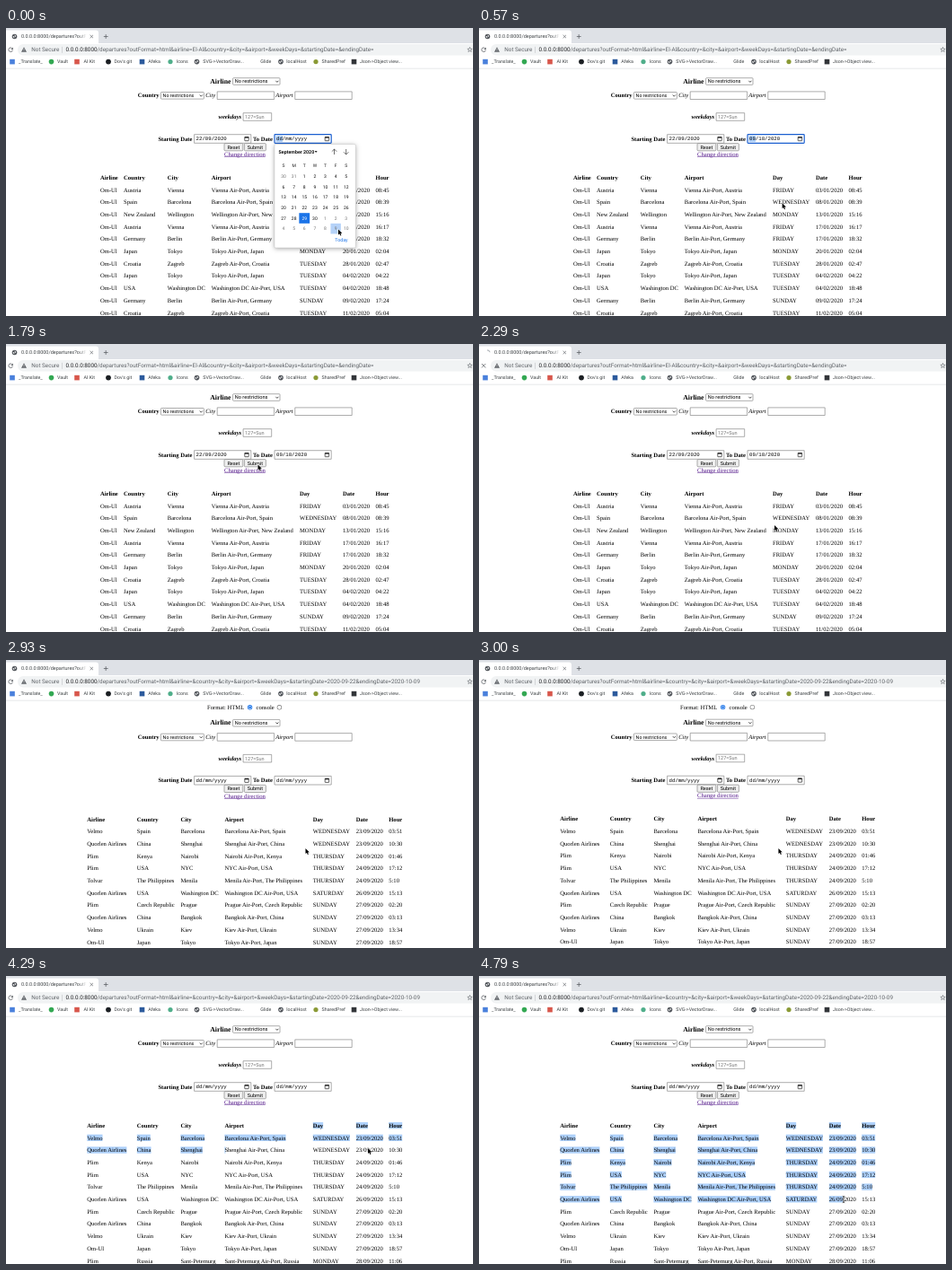
Recreate the animation shown at these times as an HTML page with a canvas. Size 520x321 px, loop 5 s.

```html
<!DOCTYPE html>
<html lang="en">
<head>
<meta charset="utf-8">
<title>Departures</title>
<style>
html, body { margin: 0; width: 100%; height: 100%; overflow: hidden; background: #fff; }
canvas { display: block; width: 520px; height: 321px; }
</style>
</head>
<body>
<canvas id="stage"></canvas>
<script>
const W = 520, H = 321, LOOP = 5000, TICK = 500 / 7;
const canvas = document.getElementById('stage');
const dpr = window.devicePixelRatio || 1;
canvas.width = W * dpr;
canvas.height = H * dpr;
const c = canvas.getContext('2d');
c.scale(dpr, dpr);
c.textRendering = 'geometricPrecision';

const SERIF = '"Liberation Serif", "Times New Roman", serif';
const SANS = 'Roboto, Arial, sans-serif';
const MONO = '"Liberation Mono", "Courier New", monospace';
const BODY = 6.6, ROW = 13.7, TOP = 166.6, SCROLL = 10.7;
const PAGE_TOP = 45.5;

const HEAD = ['Airline', 'Country', 'City', 'Airport', 'Day', 'Date', 'Hour'];

// airline, country, city, day, date, hour
function parse(list) {
  return [HEAD, ...list.trim().split('\n').map(line => {
    const [air, land, city, day, date, hour] = line.trim().split('|');
    return [air, land, city, `${city} Air-Port, ${land}`, day, date + '/2020', hour];
  })];
}

const before = {
  cols: [105, 131, 179.8, 228.8, 327, 375, 411.5],
  rows: parse(`
    Om-Ul|Austria|Vienna|FRIDAY|03/01|08:45
    Om-Ul|Spain|Barcelona|WEDNESDAY|08/01|08:39
    Om-Ul|New Zealand|Wellington|MONDAY|13/01|15:16
    Om-Ul|Austria|Vienna|FRIDAY|17/01|16:17
    Om-Ul|Germany|Berlin|FRIDAY|17/01|18:32
    Om-Ul|Japan|Tokyo|MONDAY|20/01|02:04
    Om-Ul|Croatia|Zagreb|TUESDAY|28/01|02:47
    Om-Ul|Japan|Tokyo|TUESDAY|04/02|04:22
    Om-Ul|USA|Washington DC|TUESDAY|04/02|18:48
    Om-Ul|Germany|Berlin|SUNDAY|09/02|17:24
    Om-Ul|Croatia|Zagreb|TUESDAY|11/02|05:04`)
};
const after = {
  cols: [90.3, 145.8, 194.4, 243.4, 341.8, 389.8, 426.2],
  rows: parse(`
    Velmo|Spain|Barcelona|WEDNESDAY|23/09|03:51
    Quorlen Airlines|China|Shenghai|WEDNESDAY|23/09|10:30
    Plim|Kenya|Nairobi|THURSDAY|24/09|01:46
    Plim|USA|NYC|THURSDAY|24/09|17:12
    Tolvar|The Philippines|Menila|THURSDAY|24/09|5:10
    Quorlen Airlines|USA|Washington DC|SATURDAY|26/09|15:13
    Plim|Czech Republic|Prague|SUNDAY|27/09|02:20
    Quorlen Airlines|China|Bangkok|SUNDAY|27/09|03:13
    Velmo|Ukrain|Kiev|SUNDAY|27/09|13:34
    Om-Ul|Japan|Tokyo|SUNDAY|27/09|18:57
    Plim|Russia|Sant-Petemurg|MONDAY|28/09|11:06`)
};

const HOST = '0.0.0.0:8000';
const QUERY = '/departures?outFormat=html&airline=';
const REST = '&country=&city=&airport=&weekDays=&startingDate=';

// Timeline
const CLOSE = [140, 290], BLUR = 1780, LOAD = 1850, SWAP = 2430, LOADED = 2500;
const scrollKeys = [[2980, 0], [3220, SCROLL]];
const selectKeys = [[4080, 4], [4286, 17], [4571, 38], [4786, 47.55]];
const pathX = [[360, 370], [929, 266.5], [1286, 263], [1500, 280], [2071, 281],
  [2286, 329], [2500, 333.5], [2929, 333.5], [3429, 332.5], [4000, 397], [4286, 403], [4571, 405], [4786, 406]];
const pathY = [[360, 224.5], [929, 131], [1286, 132.8], [1500, 134], [2071, 135],
  [2286, 202], [2500, 210], [2929, 210], [3429, 209], [4000, 180.5], [4286, 192], [4571, 237], [4786, 249]];

const ease = p => p * p * (3 - 2 * p);
const same = p => p;

function at(keys, t, curve = same) {
  if (t <= keys[0][0]) return keys[0][1];
  for (let i = 1; i < keys.length; i++) {
    const [t0, a] = keys[i - 1], [t1, b] = keys[i];
    if (t < t1) return a + (b - a) * curve((t - t0) / (t1 - t0));
  }
  return keys[keys.length - 1][1];
}

// Drawing helpers: y is the middle of the capitals
function text(s, x, y, size = BODY, family = SERIF, color = '#000', style = '', align = 'left') {
  c.font = `${style} ${size}px ${family}`;
  c.fillStyle = color;
  c.textAlign = align;
  c.fillText(s, x, y + size * 0.34);
}
const bold = (s, x, y, size) => text(s, x, y, size, SERIF, '#000', 'bold');
const italic = (s, x, y) => text(s, x, y, BODY, SERIF, '#000', 'italic');
const ui = (s, x, y, size = 5.3, color = '#222', align) => text(s, x, y, size, SANS, color, '', align);

function rect(x, y, w, h, fill) {
  c.fillStyle = fill;
  c.fillRect(x, y, w, h);
}
function box(x, y, w, h, fill, stroke, r = 0, line = 0.6) {
  c.beginPath();
  c.roundRect(x, y, w, h, r);
  if (fill) { c.fillStyle = fill; c.fill(); }
  if (stroke) { c.strokeStyle = stroke; c.lineWidth = line; c.stroke(); }
}
function disc(x, y, r, fill) {
  c.beginPath();
  c.arc(x, y, r, 0, 7);
  c.fillStyle = fill;
  c.fill();
}
function lines(color, width, ...paths) {
  c.strokeStyle = color;
  c.lineWidth = width;
  c.beginPath();
  for (const p of paths)
    for (let i = 0; i < p.length; i += 2) i ? c.lineTo(p[i], p[i + 1]) : c.moveTo(p[i], p[i + 1]);
  c.stroke();
}
function shape(color, ...p) {
  c.beginPath();
  for (let i = 0; i < p.length; i += 2) c.lineTo(p[i], p[i + 1]);
  c.closePath();
  c.fillStyle = color;
  c.fill();
}

function globe(x, y) {
  disc(x, y, 2.8, '#50545a');
  shape('#fff', x - 1.9, y - 0.6, x - 0.2, y - 0.2, x - 0.3, y + 1.7, x - 1.5, y + 0.8);
  shape('#fff', x + 0.1, y - 1.9, x + 1.6, y - 0.8, x + 1.2, y + 0.7, x + 0.3, y - 0.4);
}

function browser(t) {
  const loading = t >= LOAD && t < LOADED;
  rect(0, 0, W, PAGE_TOP, '#fff');
  rect(0, 0, W, 17, '#dee1e6');
  box(-4, 2.5, 107, 18, '#fff', null, 3);
  rect(0, 17, W, PAGE_TOP - 17, '#fff');

  if (loading) {
    const a = -t / 160;
    c.beginPath();
    c.arc(9.5, 9.5, 2.6, a, a + 1.6);
    c.strokeStyle = '#8a8f96';
    c.lineWidth = 0.8;
    c.stroke();
  } else globe(9.5, 9.5);
  ui('0.0.0.0:8000/departures?outF', 17, 9.5, 5.5, '#3c4043');
  const fade = c.createLinearGradient(80, 0, 90, 0);
  fade.addColorStop(0, 'rgba(255,255,255,0)');
  fade.addColorStop(1, '#fff');
  rect(80, 5, 13, 9, fade);
  lines('#5f6368', 0.7, [93.6, 7.8, 97, 11.2], [97, 7.8, 93.6, 11.2]);
  lines('#5f6368', 0.8, [108.8, 9.5, 113.6, 9.5], [111.2, 7.1, 111.2, 11.9]);

  box(13, 18, 530, 12.5, '#f1f3f4', null, 6);
  if (loading) lines('#5f6368', 0.8, [3, 22, 7.4, 26.4], [7.4, 22, 3, 26.4]);
  else {
    c.beginPath();
    c.arc(5.2, 24.2, 2.3, 0.2, 5.4);
    c.strokeStyle = '#5f6368';
    c.lineWidth = 0.8;
    c.stroke();
    shape('#5f6368', 7.8, 21.4, 7.8, 23.9, 5.4, 23.9);
  }
  shape('#5f6368', 20, 21.3, 23, 26.7, 17, 26.7);
  rect(19.7, 23, 0.6, 1.7, '#fff');
  rect(19.7, 25.2, 0.6, 0.6, '#fff');
  ui('Not Secure', 28.3, 24.2, 6.34, '#5f6368');
  rect(62.3, 20.8, 0.5, 7, '#b4b7bb');

  const [air, from, to] = t < SWAP ? ['El-Al', '', ''] : ['', '2020-09-22', '2020-10-09'];
  ui(HOST, 66.5, 24.2, 6.34, '#202124');
  const x = 66.5 + c.measureText(HOST).width;
  ui(QUERY + air + REST + from + '&endingDate=' + to, x, 24.2, 6.34, '#5f6368');

  c.beginPath();
  for (let i = 0; i < 10; i++) {
    const r = i % 2 ? 1.2 : 2.8, a = i * Math.PI / 5 - Math.PI / 2;
    c.lineTo(516.5 + r * Math.cos(a), 24.2 + r * Math.sin(a));
  }
  c.closePath();
  c.strokeStyle = '#5f6368';
  c.lineWidth = 0.6;
  c.stroke();

  const y = 37.6;
  const mark = (x, color) => rect(x - 2.8, y - 2.8, 5.6, 5.6, color);
  mark(7, '#4a80dc');
  disc(50.5, y, 2.8, '#34a853');
  mark(79, '#d8574c');
  disc(114, y, 2.9, '#1b1f23');
  mark(151.5, '#2c5a9c');
  disc(183, y, 2.6, '#4fae8a');
  globe(212.5, y);
  globe(306, y);
  disc(345, y, 2.6, '#8a9a35');
  mark(387.5, '#33363a');
  const marks = [['_Translate_', 14], ['Vault', 57], ['AI Kit', 86.5], ["Dov's git", 120.5], ['Afeka', 158.3],
    ['Icons', 189.8], ['SVG->VectorDraw...', 219.3], ['Glide', 283.3], ['localHost', 312.3],
    ['SharedPref', 351.6], ['Json->Object view...', 394]];
  for (const [s, mx] of marks) ui(s, mx, y, 5.3, '#3c4043');
  rect(0, 44.8, W, 0.6, '#d5d7da');
}

function select(x, y, w, size) {
  box(x, y - 3.8, w, 7.6, '#fff', '#767676', 0.8);
  ui('No restrictions', x + 2.2, y, size, '#000');
  lines('#222', 0.8, [x + w - 4.6, y - 0.7, x + w - 3.1, y + 0.9, x + w - 1.6, y - 0.7]);
}
const input = (x, y, w) => box(x, y - 4.3, w, 8.6, '#fff', '#767676');

function dateInput(x, y, value, focus) {
  box(x, y - 4.8, 63.2, 9.6, '#fff', focus ? '#1b5fd0' : '#767676', focus ? 0.8 : 0, focus ? 1.2 : 0.6);
  if (focus) rect(x + 1.6, y - 3.2, 7.4, 6.6, '#a9cdf8');
  text(value, x + 2, y, 5.7, MONO);
  const ix = x + 56.2;
  box(ix, y - 2, 4.4, 4.2, '#fff', '#222', 0.3, 0.7);
  rect(ix, y - 2.3, 4.4, 1.4, '#222');
}

function button(s, x, y, w) {
  box(x, y - 4.1, w, 8.2, '#efefef', '#767676', 1);
  ui(s, x + w / 2, y, 5.5, '#000', 'center');
}

function form(t) {
  const fresh = t >= SWAP;
  if (fresh) {
    text('Format: HTML', 224, 42.4);
    disc(271.6, 42.1, 2.7, '#1a73e8');
    disc(271.6, 42.1, 1.9, '#fff');
    disc(271.6, 42.1, 1.4, '#1a73e8');
    text('console', 278.6, 42.4);
    disc(304.4, 42.1, 2.7, '#767676');
    disc(304.4, 42.1, 2.1, '#fff');
  }
  bold('Airline', 227.3, 59, 7.72);
  select(252.6, 59.5, 52.4, 5.6);
  bold('Country', 146.8, 75.2);
  select(172.4, 75.3, 48, 5.3);
  italic('City', 222.2, 75.2);
  input(235.2, 75.2, 63.4);
  italic('Airport', 300.2, 75.2);
  input(321.8, 75.2, 63.4);
  text('weekdays', 236.5, 99, BODY, SERIF, '#000', 'italic bold');
  input(264.1, 99, 31.6);
  ui('127=Sun', 266, 99, 5.5, '#757575');

  const blank = 'dd/mm/yyyy';
  bold('Starting Date', 169.4, 123.5);
  dateInput(209.6, 123.5, fresh ? blank : '22/09/2020', false);
  bold('To Date', 275, 123.5);
  dateInput(299, 123.5, fresh || t < CLOSE[0] ? blank : '09/10/2020', t < BLUR);
  button('Reset', 243, 132.7, 20.8);
  button('Submit', 265.4, 132.7, 24);
  text('Change direction', 243, 140.6, BODY + 0.1, SERIF, '#551a8b');
  rect(243, 143.4, 45.8, 0.5, '#551a8b');
}

function table({ cols, rows }, end) {
  rows.forEach((row, r) => row.forEach((s, i) => {
    const y = TOP + r * ROW, n = r * 7 + i, style = r ? '' : 'bold';
    if (n >= 4 && n < end) {
      c.font = `${style} ${BODY}px ${SERIF}`;
      rect(cols[i], y - 3.7, c.measureText(s).width * Math.min(1, end - n), 7.4, '#aed1fb');
    }
    text(s, cols[i], y, BODY, SERIF, '#000', style);
  }));
}

function calendar(alpha) {
  c.save();
  c.globalAlpha = alpha;
  c.shadowColor = 'rgba(0,0,0,.35)';
  c.shadowBlur = 5 * dpr;
  c.shadowOffsetY = dpr;
  box(299, 129.5, 90.3, 115.5, '#fff', null, 1.5);
  c.shadowColor = 'transparent';
  box(299, 129.5, 90.3, 115.5, null, '#c4c4c4', 1.5, 0.5);

  text('September 2020', 303.6, 138, 5.3, SANS, '#111', 'bold');
  shape('#222', 343.6, 137.1, 346.6, 137.1, 345.1, 139);
  for (const [x, d] of [[365.5, -1], [378.7, 1]])
    lines('#333', 0.7, [x, 138 - 3 * d, x, 138 + 3 * d], [x - 2.7, 138 + 0.3 * d, x, 138 + 3 * d, x + 2.7, 138 + 0.3 * d]);

  const colX = i => 309 + i * 11.63;
  [...'SMTWTFS'].forEach((s, i) => ui(s, colX(i), 153.6, 5, '#222', 'center'));
  for (let i = 0; i < 42; i++) {
    const n = i - 1, x = colX(i % 7), y = 165.4 + Math.floor(i / 7) * 11.65;
    const other = n < 1 || n > 30;
    const day = n < 1 ? n + 31 : n > 30 ? n - 30 : n;
    if (n === 29) rect(x - 5.9, y - 5.8, 11.8, 11.6, '#1a73e8');
    if (n === 39) rect(x - 5.7, y - 5.8, 11.4, 11.6, '#b5d2f8');
    ui(day, x, y, 5, n === 29 ? '#fff' : other ? '#757575' : '#111', 'center');
  }
  ui('Today', 373.4, 236.6, 5.3, '#1a73e8', 'center');
  c.restore();
}

function pointer(t) {
  const x = at(pathX, t, ease), y = at(pathY, t, ease);
  const beam = (t > 1200 && t < 1400) || t > 4400;
  if (beam) {
    const bar = [[x - 1.2, y - 3.6, x, y - 3, x + 1.2, y - 3.6], [x, y - 3, x, y + 3],
      [x - 1.2, y + 3.6, x, y + 3, x + 1.2, y + 3.6]];
    lines('#fff', 1.5, ...bar);
    lines('#111', 0.8, ...bar);
    return;
  }
  c.save();
  c.translate(x, y);
  c.lineJoin = 'round';
  c.beginPath();
  for (const [px, py] of [[0, 0], [0, 6], [1.4, 4.8], [2.4, 7], [3.4, 6.6], [2.5, 4.4], [4.3, 4.3]]) c.lineTo(px, py);
  c.closePath();
  c.strokeStyle = '#fff';
  c.lineWidth = 1;
  c.stroke();
  c.fillStyle = '#000';
  c.fill();
  c.restore();
}

function draw(now) {
  const t = Math.floor(((now % LOOP) + 4) / TICK) * TICK + 0.5;
  const fresh = t >= SWAP;
  rect(0, 0, W, H, '#fff');

  c.save();
  c.beginPath();
  c.rect(0, PAGE_TOP, W, H - PAGE_TOP);
  c.clip();
  if (fresh) c.translate(0, SCROLL - at(scrollKeys, t, ease));
  form(t);
  table(fresh ? after : before, at(selectKeys, t));
  c.restore();

  browser(t);
  const alpha = at([[CLOSE[0] - TICK, 1], [CLOSE[1] - 5, 0]], t);
  if (alpha > 0.01) calendar(alpha);
  pointer(t);
  requestAnimationFrame(draw);
}
requestAnimationFrame(draw);
</script>
</body>
</html>
```
